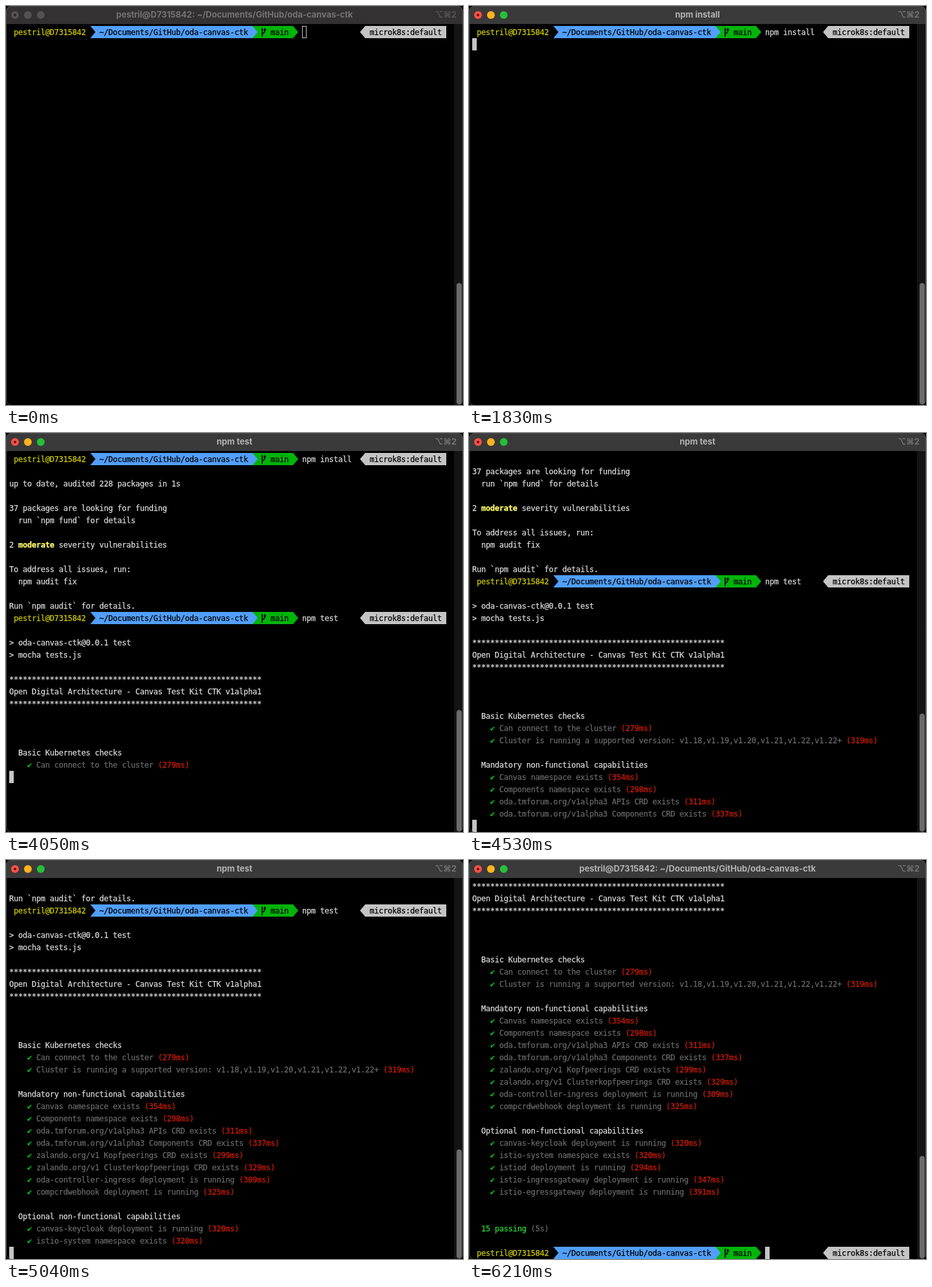
Animation of 710x620 px, one loop 6.24 s. Source, as an HTML page with a canvas:

```html
<!DOCTYPE html>
<html lang="en">
<head>
<meta charset="utf-8">
<title>Terminal</title>
<style>
  html, body { margin: 0; width: 100%; height: 100%; overflow: hidden; background: #000; }
  canvas { display: block; width: 710px; height: 620px; }
</style>
</head>
<body>
<canvas id="stage" width="710" height="620"></canvas>
<script>
const ctx = document.getElementById('stage').getContext('2d');
const W = 710, H = 620, LOOP = 6240;
const CELL = 7, LINE = 19, LEFT = 5, TOP = 31, ROWS = 31;
const MONO = '"DejaVu Sans Mono", "Liberation Mono", monospace';
const SANS = 'Inter, "DejaVu Sans", sans-serif';
const FG = '#dadada', DIM = '#686868', RED = '#d01c08', GREEN = '#00c818',
      YELLOW = '#cfcc00', BLUE = '#519ffb', BRANCH = '#00b40a', PALE = '#c4c4c4';

const USER = 'pestril@D7315842', PATH = '~/Documents/GitHub/oda-canvas-ctk';
const HOME = USER + ': ' + PATH;

// Timeline in ms
const FOCUS = 450, HIDE_MOUSE = 1020;
const install = { text: 'npm install', start: 1020, step: 42, enter: 1530 };
const test = { text: 'npm test', start: 2520, step: 36, enter: 2830 };
const idle = { text: '', start: LOOP, step: 1, enter: Infinity };
const BACK = 2250, DONE = 5420;

// Every terminal line with the time it is printed
const lines = [];
const add = (t, ...runs) => lines.push({ t, runs });
const print = (t, text) => text.split('\n').forEach(s => add(t, [s, FG]));
const prompt = (t, cmd) => lines.push({ t, cmd });

prompt(0, install);
print(2130, `
up to date, audited 228 packages in 1s

37 packages are looking for funding
  run \`npm fund\` for details
`);
add(2130, ['2 ', FG], ['moderate', '#fffc67', true], [' severity vulnerabilities', FG]);
print(2130, `
To address all issues, run:
  npm audit fix

Run \`npm audit\` for details.`);
prompt(BACK, test);
print(3390, `
> oda-canvas-ctk@0.0.1 test
> mocha tests.js
`);
const stars = '*'.repeat(56);
print(3870, `${stars}
Open Digital Architecture - Canvas Test Kit CTK v1alpha1
${stars}
`);

const SPEED = 3.5;
let clock = 3927;
function suite(title, checks) {
  print(clock, title);
  for (const [name, ms] of checks) {
    clock += ms / SPEED;
    add(clock, ['    ✔ ', GREEN], [name + ' ', DIM], [`(${ms}ms)`, RED]);
  }
}
suite('\n\n  Basic Kubernetes checks', [
  ['Can connect to the cluster', 279],
  ['Cluster is running a supported version: v1.18,v1.19,v1.20,v1.21,v1.22,v1.22+', 319]
]);
suite('\n  Mandatory non-functional capabilities', [
  ['Canvas namespace exists', 354],
  ['Components namespace exists', 298],
  ['oda.tmforum.org/v1alpha3 APIs CRD exists', 311],
  ['oda.tmforum.org/v1alpha3 Components CRD exists', 337],
  ['zalando.org/v1 Kopfpeerings CRD exists', 299],
  ['zalando.org/v1 Clusterkopfpeerings CRD exists', 329],
  ['oda-controller-ingress deployment is running', 309],
  ['compcrdwebhook deployment is running', 325]
]);
suite('\n  Optional non-functional capabilities', [
  ['canvas-keycloak deployment is running', 320],
  ['istio-system namespace exists', 320],
  ['istiod deployment is running', 294],
  ['istio-ingressgateway deployment is running', 347],
  ['istio-egressgateway deployment is running', 391]
]);
print(clock, '\n');
add(clock, ['  15 passing', '#28dc38'], [' (5s)', DIM]);
print(clock, '');
prompt(DONE, idle);

const colX = c => LEFT + c * CELL;
const clamp = (v, a, b) => Math.min(b, Math.max(a, v));

function rect(x, y, w, h, color) {
  ctx.fillStyle = color;
  ctx.fillRect(x, y, w, h);
}

function shape(points, color) {
  ctx.fillStyle = color;
  ctx.beginPath();
  points.forEach(([x, y]) => ctx.lineTo(x, y));
  ctx.closePath();
  ctx.fill();
}

function disc(x, y, r, color) {
  ctx.fillStyle = color;
  ctx.beginPath();
  ctx.arc(x, y, r, 0, Math.PI * 2);
  ctx.fill();
}

// The hairline stroke gives the slightly heavier text of a desktop terminal
function write(text, col, y, color, bold) {
  ctx.font = `${bold ? 'bold ' : ''}12px ${MONO}`;
  ctx.textAlign = 'left';
  ctx.fillStyle = ctx.strokeStyle = color;
  ctx.lineWidth = .25;
  [...text].forEach((ch, i) => {
    if (ch === ' ') return;
    ctx.fillText(ch, colX(col + i), y + 14);
    ctx.strokeText(ch, colX(col + i), y + 14);
  });
  return col + text.length;
}

// Powerline separator; dir is 1 for right, -1 for left
function arrow(x, y, dir, color) {
  shape([[x, y], [x + 8 * dir, y + LINE / 2], [x, y + LINE]], color);
}

function branchIcon(x, y) {
  ctx.strokeStyle = '#000';
  ctx.lineWidth = 1.7;
  ctx.beginPath();
  ctx.moveTo(x + 2, y + 3);
  ctx.lineTo(x + 2, y + 17);
  ctx.moveTo(x + 6, y + 5);
  ctx.lineTo(x + 6, y + 8);
  ctx.quadraticCurveTo(x + 6, y + 10, x + 2, y + 13);
  ctx.stroke();
  shape([[x + 3.5, y + 7], [x + 6, y + 3], [x + 8.5, y + 7]], '#000');
}

function typed(cmd, t) {
  return clamp(Math.floor((t - cmd.start) / cmd.step) + 1, 0, cmd.text.length);
}

function drawPrompt(cmd, y, t) {
  write(USER, 1, y, YELLOW);
  rect(131, y, 252, LINE, BLUE);
  arrow(131, y, 1, '#000');
  write(PATH, 20, y, '#000');
  rect(383, y, 63, LINE, BRANCH);
  arrow(383, y, 1, BLUE);
  branchIcon(396, y);
  write('main', 58, y, '#000');
  arrow(446, y, 1, BRANCH);
  write(cmd.text.slice(0, typed(cmd, t)), 65, y, FG);
  arrow(558, y, -1, PALE);
  rect(558, y, 126, LINE, PALE);
  write('microk8s:default', 80, y, '#000');
}

function drawScreen(t, active) {
  const shown = lines.filter(l => l.t <= t);
  const last = shown[shown.length - 1];
  const editing = last.cmd && t < last.cmd.enter;
  const row = editing ? shown.length - 1 : shown.length;
  const col = editing ? 65 + typed(last.cmd, t) : 0;
  const scroll = Math.max(0, row - ROWS + 1);

  shown.slice(scroll).forEach((line, i) => {
    const y = TOP + i * LINE;
    if (line.cmd) return drawPrompt(line.cmd, y, t);
    let c = 0;
    for (const [text, color, bold] of line.runs) c = write(text, c, y, color, bold);
  });

  const cy = TOP + (row - scroll) * LINE;
  if (active) {
    rect(colX(col), cy, CELL, LINE, PALE);
  } else {
    ctx.strokeStyle = PALE;
    ctx.lineWidth = 1;
    ctx.strokeRect(colX(col) + .5, cy + .5, CELL - 1, LINE - 1);
  }
  drawScrollbar(97 + scroll);
}

function drawScrollbar(total) {
  rect(696, 28, 14, 592, '#141414');
  const h = 590 * ROWS / total;
  ctx.fillStyle = '#6b6b6b';
  ctx.beginPath();
  ctx.roundRect(700, 619 - h, 8, h, 4);
  ctx.fill();
}

function titleAt(t) {
  for (const [cmd, end] of [[install, BACK], [test, DONE]]) {
    if (t >= cmd.enter && t < end) return cmd.text;
  }
  return HOME;
}

function drawTitle(t, active) {
  rect(0, 0, W, 28, active ? '#3b3a3a' : '#333131');
  const lights = active ? ['#ff5147', '#ffb41c', '#24c138'] : Array(3).fill('#545252');
  lights.forEach((color, i) => disc(14 + 20 * i, 14, 6, color));
  disc(14, 14, 2, active ? '#6a0800' : '#262424');

  ctx.font = `bold 13px ${SANS}`;
  ctx.textAlign = 'center';
  ctx.fillStyle = active ? '#b4b3b3' : '#757373';
  ctx.fillText(titleAt(t), 355, 18);
  ctx.textAlign = 'right';
  ctx.fillStyle = active ? '#737272' : '#565454';
  ctx.fillText('⌥⌘2', 700, 18);
}

function drawMouse(t) {
  if (t < 270 || t >= HIDE_MOUSE) return;
  const k = 1 - clamp((t - 270) / 150, 0, 1);
  const x = 120 - 30 * k * k, y = 8 - 24 * k * k;
  const tip = [[0, 0], [0, 14], [3.2, 11], [5.3, 16], [7.7, 15], [5.6, 10.2], [9.8, 10]];
  shape(tip.map(([a, b]) => [x + a, y + b]), '#000');
  ctx.strokeStyle = '#fff';
  ctx.lineWidth = 1.1;
  ctx.stroke();
}

function drawBorder() {
  ctx.strokeStyle = '#4a4a4a';
  ctx.lineWidth = 1;
  ctx.beginPath();
  ctx.roundRect(.5, .5, W - 1, H, 8);
  ctx.stroke();
}

function draw(t) {
  const active = t >= FOCUS;
  rect(0, 0, W, H, '#000');
  ctx.save();
  ctx.beginPath();
  ctx.roundRect(0, 0, W, H, 8);
  ctx.clip();
  drawScreen(t, active);
  drawTitle(t, active);
  ctx.restore();
  drawBorder();
  drawMouse(t);
}

const begin = performance.now();
function tick() {
  draw((performance.now() - begin) % LOOP);
  requestAnimationFrame(tick);
}
tick();
</script>
</body>
</html>
```
